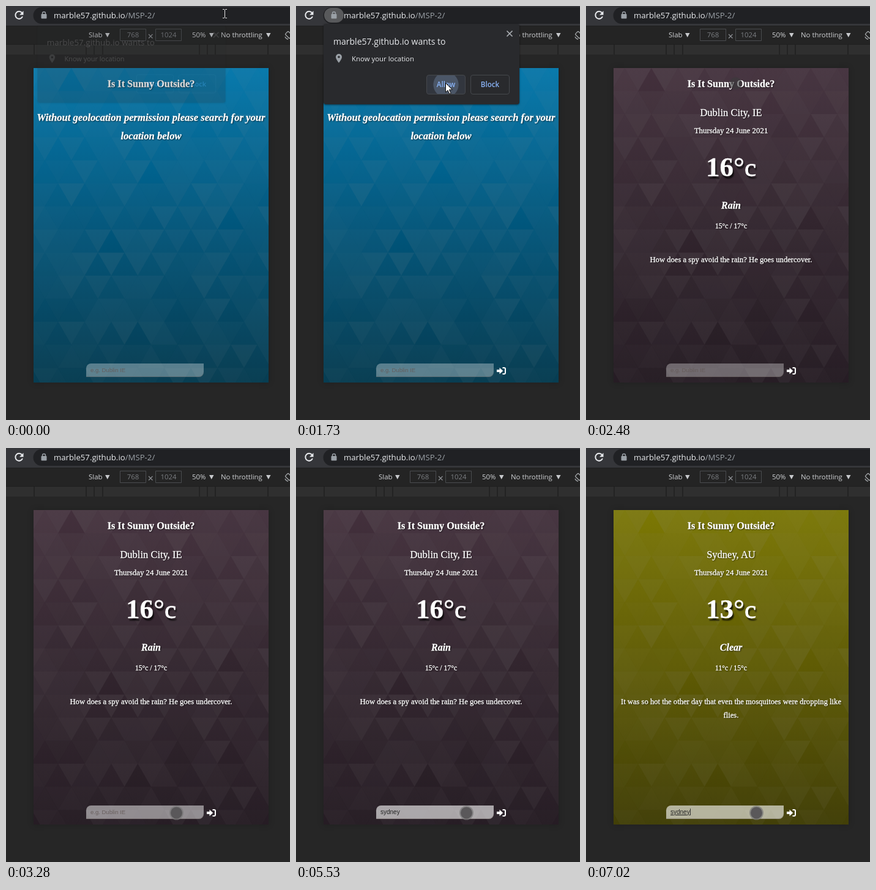
An HTML page with a canvas for the animation above (7270 ms loop, 464 px wide and 674 px high).

```html
<!DOCTYPE html>
<html lang="en">
<head>
<meta charset="utf-8">
<title>Weather demo</title>
<style>
html, body { margin: 0; width: 100%; height: 100%; overflow: hidden; background: #262626; }
#stage { position: relative; width: 464px; height: 674px; overflow: hidden; background: #262626;
  font-family: "Open Sans", "Noto Sans", sans-serif; color: #e8eaed; }
#stage * { box-sizing: border-box; }
svg, .t, .page, .input, .dialog, .button, .theme, canvas { position: absolute; }
svg { left: 0; top: 0; overflow: visible; }
.t { line-height: 0; white-space: nowrap; }

.url { left: 78px; top: 15px; font-size: 13.2px; }
.url span { color: #9aa0a6; }
.tool { top: 47px; font-size: 11.4px; color: #d0d2d5; }
.dim { color: #7b7e82; width: 43px; text-align: center; }

.page { left: 45px; top: 101px; width: 384px; height: 512px; overflow: hidden;
  box-shadow: 0 0 10px rgba(0,0,0,.2);
  font-family: "Liberation Serif", "Noto Serif", serif; color: #fff; text-shadow: 1px 1px 2px rgba(0,0,0,.7); }
.page .t { left: 0; width: 384px; text-align: center; -webkit-text-stroke: .3px #fff; }
.theme { inset: 0; display: none; }
.geo .theme.geo, .rain .theme.rain, .clear .theme.clear { display: block; }
.sky-bg.geo { background: linear-gradient(#0078ae, #00567c 50%, #00394f); }
.sky-bg.rain { background: linear-gradient(#43303c, #32252e 50%, #21171f); }
.sky-bg.clear { background: linear-gradient(#7c7804, #5f5b04 50%, #3e3b00); }
.title { top: 26px; font-size: 16.2px; font-weight: bold; }
.notice { font-size: 16.6px; font-weight: bold; font-style: italic; }
.city { top: 72.5px; font-size: 16.5px; }
.date { top: 101.7px; font-size: 12.9px; }
.temp { top: 161px; font-size: 45px; font-weight: bold; text-shadow: 2px 4px 2px rgba(0,0,0,.75); }
.temp span { font-weight: normal; font-size: 43px; -webkit-text-stroke: .8px #fff; }
.sky { top: 223.8px; font-size: 16px; font-weight: bold; font-style: italic; }
.range { top: 258px; font-size: 11.7px; }
.joke { top: 311.7px; font-size: 12.63px; }

.input { left: 131px; top: 582px; width: 192px; height: 22px; padding-left: 7px;
  border-radius: 8px 0; background: rgba(255,255,255,.32); box-shadow: inset 0 -1px rgba(90,75,70,.35);
  font: 10px/22px "Liberation Sans", Arial, sans-serif; color: #222; white-space: nowrap; }
.focusing .input { background: rgba(255,255,255,.48); }
.focus .input { background: rgba(255,255,255,.6); }
.input span { display: inline-block; height: 11px; line-height: 11px; vertical-align: middle; margin-top: -2px; }
.input .hint { font-size: 9.5px; color: rgba(100,90,88,.9); }
#stage:not(.hinted) .hint { display: none; }
.clear #typed { text-decoration: underline; text-decoration-thickness: 1px; }
.caret #typed { box-shadow: 1px 0 #333; }

.dialog { display: none; left: 45px; top: 29px; width: 320px; height: 131px; border-radius: 4px;
  background: #292a2d; box-shadow: 0 1px 3px rgba(0,0,0,.55); }
.ask .dialog, .ghost .dialog, .leaving .dialog { display: block; }
.ghost .dialog { opacity: .19; transform: scale(.96); }
.leaving .dialog { opacity: .4; transform: scale(.97); }
.button { top: 83px; width: 64px; height: 32px; border: 1px solid #45484c; border-radius: 4px; overflow: hidden;
  font-size: 11.6px; font-weight: 600; line-height: 29px; text-align: center; color: #8ab4f8; }
.hover .allow { background: #32363e; }
.press .allow { background: radial-gradient(circle 21px at 31px 15px, #4b5667 96%, #32363e 100%); }

.chipmark, .beam, .arrow, .touch, .early .enter { display: none; }
.chip .chipmark, .beamed .beam, .hover .arrow, .touch1 .touch.one, .touch2 .touch.two { display: inline; }
.chip.touch1 .chipmark { fill: #45474a; }
</style>
</head>
<body>
<div id="stage">
  <svg width="464" height="674">
    <path fill="#35363a" d="M0 0h464v33H0z"/>
    <path fill="#202124" d="M58 2h406v27H58a13.5 13.5 0 0 1 0-27"/>
    <path fill="#242424" d="M0 33h464v29H0z"/>
    <path fill="#2f2f2f" d="M0 62h464v17H0z"/>
    <path stroke="#1f1f1f" d="M0 32.5h464M0 62.5h464"/>
    <path stroke="#202020" stroke-width="1.5" d="M46 63v16M131 63v16M144 63v16M158 63v16M316 63v16M329 63v16M342 63v16M428 63v16"/>
    <path fill="none" stroke="#e8eaed" stroke-width="2" d="M26 11a6 6 0 1 0 1 6"/>
    <path fill="#e8eaed" d="M28.500 8v6.500H22z"/>
    <rect class="chipmark" x="46" y="3" width="32" height="24" rx="12" fill="#58595b"/>
    <path fill="none" stroke="#9aa0a6" stroke-width="1.4" d="M59.500 14v-2a2.500 2.500 0 0 1 5 0v2"/>
    <rect x="57.500" y="13" width="9" height="7.500" rx="1" fill="#9aa0a6"/>
    <path fill="#c8cacd" d="M162 44h7.500l-3.750 7zM332 44h7.500l-3.750 7zM425 44h7.500l-3.750 7z"/>
    <g fill="none" stroke="#4a4c4f">
      <path d="M186.500 37.500h42v19h-42zM244.500 37.500h42v19h-42z"/>
      <path stroke="#8d9094" stroke-width="1.2" d="M233 46l6.500 6.500m0-6.500l-6.500 6.500"/>
      <g stroke="#a5a8ab" stroke-width="1.3">
        <rect x="457" y="43.500" width="10" height="7" rx="1.5" transform="rotate(45 462 47)"/>
        <path d="M456 50a6 6 0 0 0 5 4"/>
      </g>
    </g>
  </svg>
  <div class="t url">marble57.github.io<span>/MSP-2/</span></div>
  <div class="t tool" style="left:135px">Slab</div>
  <div class="t tool dim" style="left:186px">768</div>
  <div class="t tool dim" style="left:244px">1024</div>
  <div class="t tool" style="left:304px">50%</div>
  <div class="t tool" style="left:351px">No throttling</div>

  <div class="page">
    <div class="theme sky-bg geo"></div>
    <div class="theme sky-bg rain"></div>
    <div class="theme sky-bg clear"></div>
    <canvas id="tiles" width="384" height="512"></canvas>
    <div class="t title">Is It Sunny Outside?</div>
    <div class="theme geo">
      <div class="t notice" style="top:81px">Without geolocation permission please search for your</div>
      <div class="t notice" style="top:111px">location below</div>
    </div>
    <div class="theme rain">
      <div class="t city">Dublin City, IE</div>
      <div class="t date">Thursday 24 June 2021</div>
      <div class="t temp">16°<span>c</span></div>
      <div class="t sky">Rain</div>
      <div class="t range">15°c / 17°c</div>
      <div class="t joke">How does a spy avoid the rain? He goes undercover.</div>
    </div>
    <div class="theme clear">
      <div class="t city">Sydney, AU</div>
      <div class="t date">Thursday 24 June 2021</div>
      <div class="t temp">13°<span>c</span></div>
      <div class="t sky">Clear</div>
      <div class="t range">11°c / 15°c</div>
      <div class="t joke">It was so hot the other day that even the mosquitoes were dropping like</div>
      <div class="t joke" style="top:333.7px">flies.</div>
    </div>
  </div>
  <div class="input"><span id="typed"></span><span class="hint">e.g. Dublin IE</span></div>
  <svg class="enter" width="464" height="674">
    <g transform="translate(328 588)">
      <path fill="#fff" d="M0 4h4.500V.8L10.200 6l-5.700 5.200V8H0z"/>
      <path fill="none" stroke="#fff" stroke-width="2" d="M9.500 1H12a2 2 0 0 1 2 2v6a2 2 0 0 1-2 2H9.500"/>
    </g>
  </svg>

  <div class="dialog">
    <div class="t" style="left:16px;top:28.5px;font-size:14px">marble57.github.io wants to</div>
    <div class="t" style="left:46px;top:56.6px;font-size:11.4px">Know your location</div>
    <svg width="320" height="131">
      <path fill="#9aa0a6" fill-rule="evenodd" d="M25 49a5 5 0 0 1 5 5c0 3.500-5 9.500-5 9.500s-5-6-5-9.500a5 5 0 0 1 5-5m0 3.200a1.800 1.800 0 1 0 0 3.600 1.800 1.800 0 0 0 0-3.600"/>
      <path stroke="#a9adb2" stroke-width="1.7" d="M299.500 11.500l9 9m0-9l-9 9"/>
    </svg>
    <div class="button allow" style="left:168px">Allow</div>
    <div class="button" style="left:240px">Block</div>
  </div>

  <svg width="464" height="674">
    <path class="beam" fill="none" stroke="#e6e6e6" d="M354 5.500h2.500l1 1 1-1h2.500M357.500 6v13M354 19.500h2.500l1-1 1 1h2.500"/>
    <path class="arrow" fill="#fff" stroke="#111" d="M244.500 125.500v15l3.500-3.300 2.800 6 2.300-1-2.700-6h4.900z"/>
    <circle class="touch one" cx="244.500" cy="126" r="10" fill="#3a3a3c" fill-opacity=".6"/>
    <g class="touch two">
      <circle cx="278.500" cy="594" r="11.500" fill="#777" fill-opacity=".7"/>
      <circle cx="278.500" cy="594" r="9.500" fill="#5a585a"/>
    </g>
  </svg>
</div>
<script>
const LOOP = 7270;
// start time, state classes, typed text
const scenes = [
  [0, 'geo hinted ghost beamed early'],
  [220, 'geo hinted ask chip beamed'],
  [970, 'geo hinted ask chip hover'],
  [1730, 'geo hinted ask chip hover press'],
  [1970, 'geo hinted leaving chip hover'],
  [2220, 'geo hinted chip touch1'],
  [2480, 'rain hinted touch1'],
  [3280, 'rain hinted focusing touch2'],
  [3530, 'rain hinted focus touch2'],
  [3780, 'rain focus touch2 caret', 's'],
  [4030, 'rain focus touch2 caret', 'sy'],
  [4530, 'rain focus touch2 caret', 'syd'],
  [4780, 'rain focus touch2 caret', 'sydn'],
  [5030, 'rain focus touch2 caret', 'sydney'],
  [5530, 'rain focus touch2', 'sydney'],
  [6020, 'clear focus touch2 caret', 'sydney'],
  [6530, 'clear focus touch2', 'sydney'],
  [7020, 'clear focus touch2 caret', 'sydney']
];
const stage = document.getElementById('stage');
const typed = document.getElementById('typed');

function drawTiles() {
  const ctx = document.getElementById('tiles').getContext('2d');
  const side = 43.4, rowHeight = 37.55;
  const plain = ['0,-3', '4,0', '6,3', '7,-2'];
  let seed = 41;
  const random = () => (seed = seed * 16807 % 2147483647) / 2147483647;
  const triangle = (x, y, height, alpha) => {
    ctx.fillStyle = `rgba(150,150,150,${alpha})`;
    ctx.beginPath();
    ctx.moveTo(x, y);
    ctx.lineTo(x - side / 2, y + height);
    ctx.lineTo(x + side / 2, y + height);
    ctx.fill();
  };
  for (let row = 0; row < 14; row++) {
    for (let col = -6; col < 6; col++) {
      const x = 192 + side * (col + row % 2 / 2), y = row * rowHeight;
      const up = plain.includes(`${row},${col}`) ? 0 : 0.03 + random() * 0.07;
      triangle(x, y, rowHeight, up);
      triangle(x + side / 2, y + rowHeight, -rowHeight, 0.06 + random() * 0.07);
    }
  }
}

drawTiles();
const start = performance.now();
let shown;

function tick() {
  const time = (performance.now() - start) % LOOP;
  const scene = scenes.findLast(([from]) => from <= time);
  if (scene !== shown) {
    const [, state, text = ''] = shown = scene;
    stage.className = state;
    typed.textContent = text;
  }
  requestAnimationFrame(tick);
}
tick();
</script>
</body>
</html>
```
